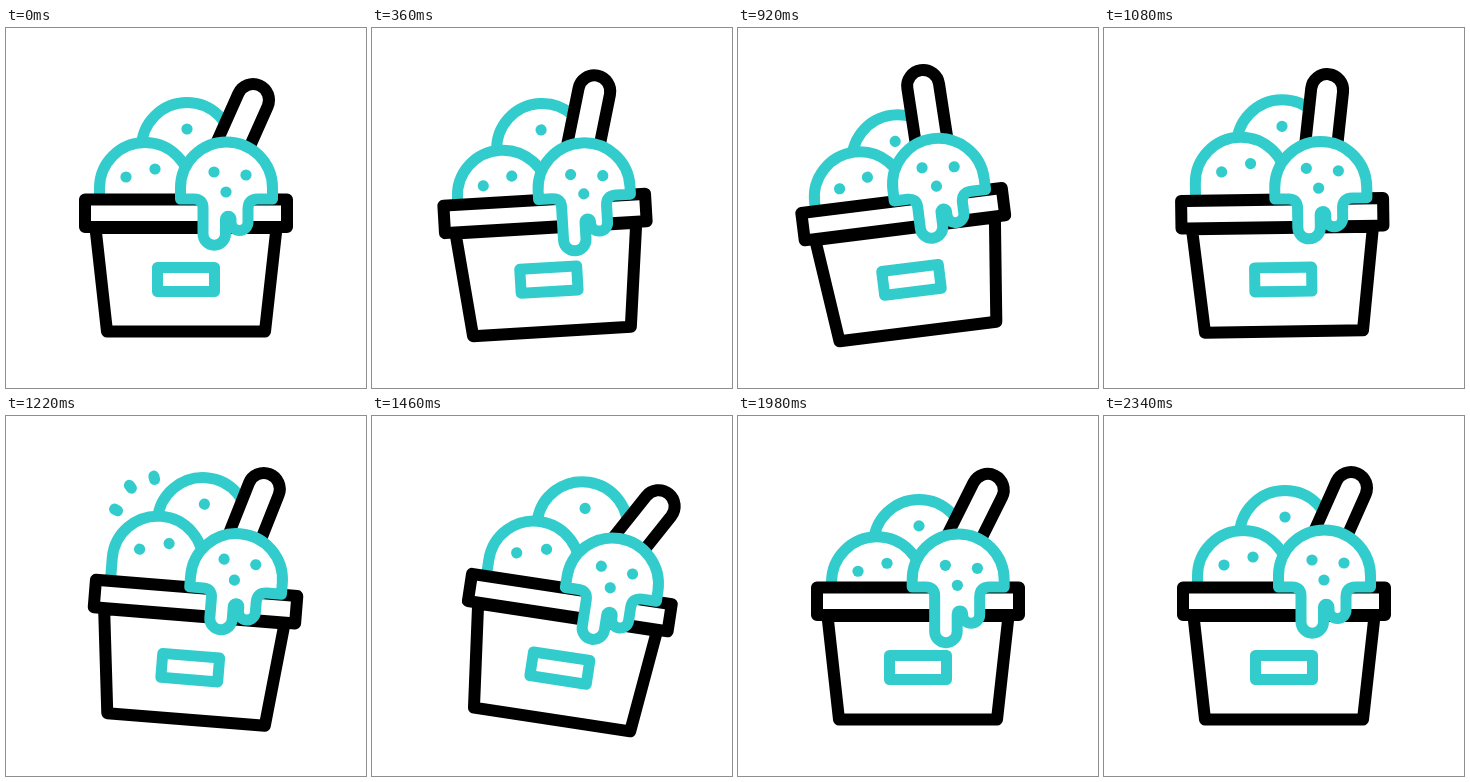
An HTML page with a canvas for the animation above (2400 ms loop, 360x360 px).

```html
<!DOCTYPE html>
<html lang="en">
<head>
<meta charset="utf-8">
<title>Ice cream cup</title>
<style>
html, body { margin: 0; width: 100%; height: 100%; overflow: hidden; background: #fff; }
canvas { display: block; width: 360px; height: 360px; }
</style>
</head>
<body>
<canvas id="stage" width="360" height="360"></canvas>
<script>
const ctx = document.getElementById('stage').getContext('2d');
const TEAL = '#33cccc', BLACK = '#000', WHITE = '#fff';
const LOOP = 2400, STEP = 20, LAST = 2340;
const rad = deg => deg * Math.PI / 180;
const progress = (t, from, to) => Math.max(0, Math.min(1, (t - from) / (to - from)));
const ease = u => (u + (1 - Math.cos(Math.PI * u)) / 2) / 2;

// Each move is [from, to, value]; the value rests between moves.
const sway = (...moves) => t =>
  moves.reduce((v, [from, to, goal]) => v + (goal - v) * ease(progress(t, from, to)), 0);

const cupTilt = sway([180, 735, -12], [735, 1400, 9.3], [1400, 1930, 0]);
const spoonTurn = sway([110, 770, -26.5], [890, 1460, 6], [1700, 2200, 0]);
const leftDrop = sway([150, 660, 13], [690, 1240, -12], [1330, 1700, 10.5], [1780, 2250, 0]);
const backDrop = sway([330, 680, 13], [880, 1240, -14.5], [1400, 1740, 12], [1840, 2300, 0]);
const ooze = sway([160, 640, 18], [660, 950, -6], [1300, 1720, 14], [1800, 2300, 0]);
const drift = sway([340, 620, -3.6], [900, 2300, 0]);

function turn(x, y, deg) {
  ctx.translate(x, y);
  ctx.rotate(rad(deg));
  ctx.translate(-x, -y);
}

function paint(d, color) {
  const path = new Path2D(d);
  ctx.lineWidth = color === BLACK ? 12 : 11;
  ctx.fillStyle = WHITE;
  ctx.fill(path);
  ctx.strokeStyle = color;
  ctx.stroke(path);
}

function dots(dx, dy, ...points) {
  ctx.fillStyle = TEAL;
  for (const [x, y] of points) {
    ctx.beginPath();
    ctx.arc(x + dx, y + dy, 5.6, 0, 7);
    ctx.fill();
  }
}

function dome(x, y) {
  paint(`M${x - 45.5} ${y + 32}V${y}a45.5 45.5 0 0 1 91 0v32`, TEAL);
}

function spoon(t) {
  ctx.save();
  turn(206, 135.4, spoonTurn(t));
  turn(247, 72, 24);
  paint('M231 150V72a16 16 0 0 1 32 0V150', BLACK);
  ctx.restore();
}

function cup() {
  paint('M89.5 200L101 303.5H259L270.5 200Z', BLACK);
  paint('M79 171.5H281V199H79Z', BLACK);
  paint('M151.5 239.5H208.5V263.5H151.5Z', TEAL);
}

function frontScoop(t) {
  const flow = ooze(t), shift = drift(t);
  const top = 160 + Math.max(0, 0.42 * flow);
  ctx.save();
  ctx.translate(shift / 2, 0);
  paint(`M174.5 171V${top}a46 46 0 0 1 92 0V171H252Q242 171 242 181
    V${194 + flow * 0.5}a8.5 8.5 0 0 1 -17 0V${191 + flow * 0.7}
    a2.75 2.75 0 0 0 -5.5 0V${206 + flow}a11.25 11.25 0 0 1 -22.5 0
    V180Q197 171 188 171Z`, TEAL);
  ctx.restore();
  dots(shift, flow * 0.56, [208, 144], [240, 147], [220, 164]);
}

function sparks(t) {
  const head = 15 * progress(t, 1190, 1320);
  const tail = 15 * progress(t, 1270, 1400);
  if (head <= tail) return;
  ctx.strokeStyle = TEAL;
  ctx.lineWidth = 11;
  for (const [x, y, deg] of [[95, 101, 205], [107, 77.3, 230], [129.4, 66.8, 252]]) {
    const dx = Math.cos(rad(deg)), dy = Math.sin(rad(deg));
    ctx.beginPath();
    ctx.moveTo(x + dx * tail, y + dy * tail);
    ctx.lineTo(x + dx * head, y + dy * head);
    ctx.stroke();
  }
}

function draw(t) {
  ctx.fillStyle = WHITE;
  ctx.fillRect(0, 0, 360, 360);
  ctx.save();
  ctx.lineCap = ctx.lineJoin = 'round';
  turn(180, 304, cupTilt(t));

  const back = backDrop(t), left = leftDrop(t);
  sparks(t);
  dome(181, 120 + back);
  dots(0, back, [181, 101]);
  spoon(t);
  dome(139, 160 + left);
  dots(0, left, [120, 149], [149, 141]);
  cup();
  frontScoop(t);
  ctx.restore();
}

const start = performance.now();
function tick() {
  const t = (performance.now() - start) % LOOP;
  draw(Math.min(LAST, Math.floor(t / STEP) * STEP));
  requestAnimationFrame(tick);
}
tick();
</script>
</body>
</html>
```
